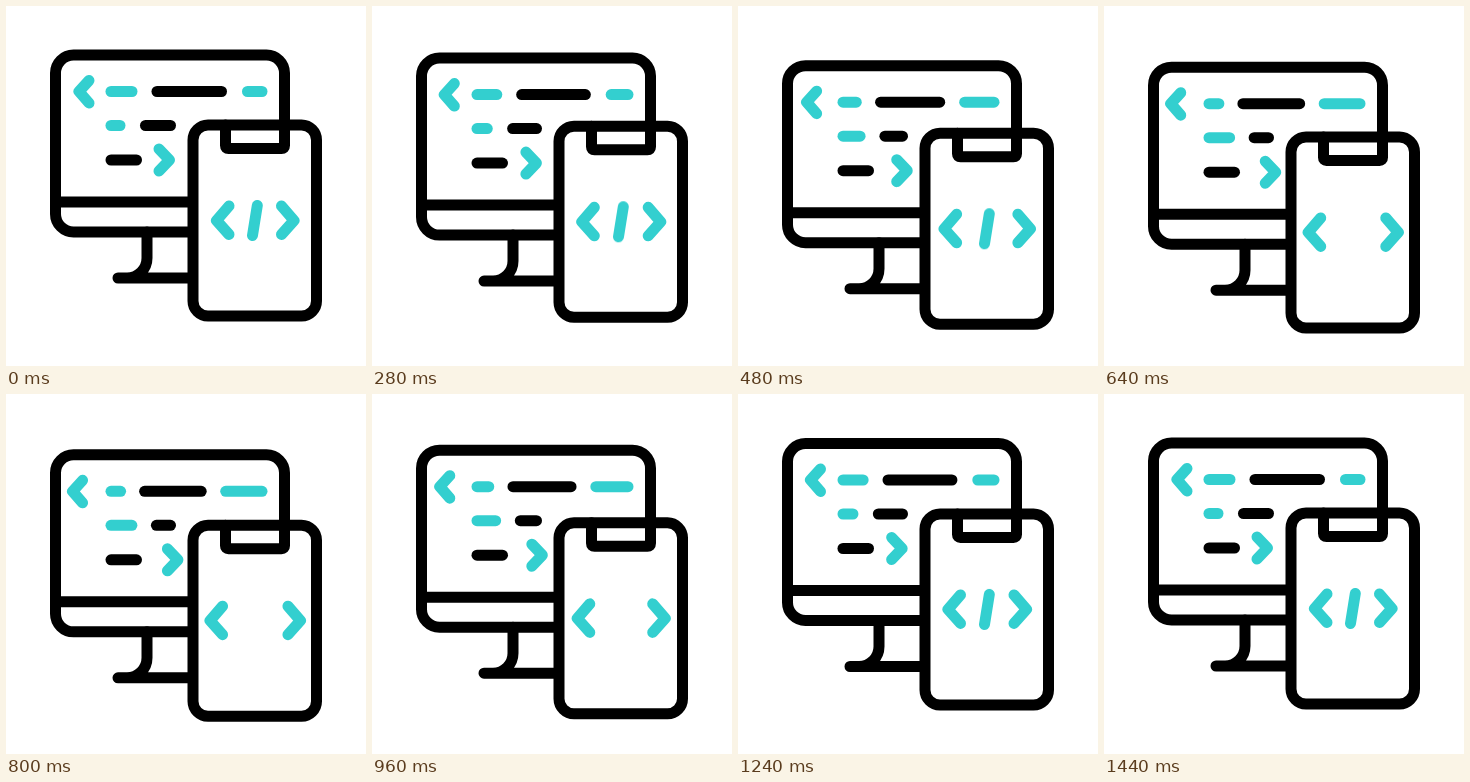
Recreate the animation shown at these times as an HTML page without scripts. Size 360x360 px, loop 1520 ms.

```html
<!DOCTYPE html>
<html lang="en">
<head>
<meta charset="utf-8">
<title>Responsive code icon</title>
<style>
  /* --lead drives the monitor; --lag drives the phone and the code marks */
  @property --lead { syntax: "<number>"; inherits: true; initial-value: 0; }
  @property --lag { syntax: "<number>"; inherits: true; initial-value: 0; }

  html, body { margin: 0; height: 100%; overflow: hidden; background: #fff; }

  svg {
    display: block;
    width: 100vw;
    height: 100vh;
    fill: none;
    stroke: #000;
    stroke-width: 11;
    stroke-linecap: round;
    stroke-linejoin: round;
    animation: lead 1520ms infinite, lag 1520ms infinite;
  }

  .monitor { transform: translateY(calc(var(--lead) * 12.2px)); }
  .phone { transform: translateY(calc(var(--lag) * 12.3px)); }
  .slide { transform: translateX(calc(var(--lag) * var(--dx) * 1px)); }
  .teal { stroke: #33cfcf; }
  .slash { animation: blink 1520ms step-end infinite; }

  .dash {
    --dx: 0;
    --dw: 0;
    x: calc((var(--x) + var(--lag) * var(--dx)) * 1px);
    width: calc((var(--w) + var(--lag) * var(--dw)) * 1px);
    height: 11px;
    rx: 5.5px;
    fill: #000;
    stroke: none;
  }
  .dash.teal { fill: #33cfcf; }

  @keyframes lead {
    0%, 6.58% { --lead: 0; animation-timing-function: cubic-bezier(.45, 0, .4, 1); }
    43.4% { --lead: 1; }
    47.4% { --lead: 1; animation-timing-function: cubic-bezier(.45, 0, .25, 1); }
    92.1%, 100% { --lead: 0; }
  }
  @keyframes lag {
    0%, 6.58% { --lag: 0; animation-timing-function: cubic-bezier(.6, 0, .45, 1); }
    48.7% { --lag: 1; animation-timing-function: cubic-bezier(.55, 0, .3, 1); }
    94.7%, 100% { --lag: 0; }
  }
  @keyframes blink {
    0% { opacity: 1; }
    36.8% { opacity: 0; }
    68.4%, 100% { opacity: 1; }
  }
</style>
</head>
<body>
<svg viewBox="0 0 360 360">
  <g class="monitor">
    <rect x="49.5" y="49" width="229" height="177" rx="18"/>
    <path d="M49.5 196H187M141 226V252a20 20 0 0 1-20 20M112 272H187"/>

    <path class="teal slide" style="--dx:-6.5" d="M83 74.5 73 85.5 83 97"/>
    <rect class="dash teal" y="80" style="--x:99.5;--w:32;--dw:-11.5"/>
    <rect class="dash" y="80" style="--x:145.5;--w:75.5;--dx:-12.5;--dw:-8"/>
    <rect class="dash teal" y="80" style="--x:236;--w:25.5;--dx:-22;--dw:22"/>

    <rect class="dash teal" y="114" style="--x:99.5;--w:20;--dw:12"/>
    <rect class="dash" y="114" style="--x:134;--w:36;--dx:11;--dw:-11"/>

    <rect class="dash" y="148.5" style="--x:99.5;--w:36.5"/>
    <path class="teal slide" style="--dx:8.5" d="M153 143 163.5 154 153 165"/>
  </g>

  <g class="phone">
    <rect x="187" y="119" width="123.5" height="191" rx="15" fill="#fff"/>
    <path d="M219.5 119V139.5q0 3 3 3H275.5q3 0 3-3V119"/>
    <path class="teal slide" style="--dx:-6.5" d="M223 200 210.5 214.5 223 228.5"/>
    <path class="teal slash" d="M251.3 199.5 246.5 229.5"/>
    <path class="teal slide" style="--dx:6.5" d="M275.5 200 288 214.5 275.5 228.5"/>
  </g>
</svg>
</body>
</html>
```
